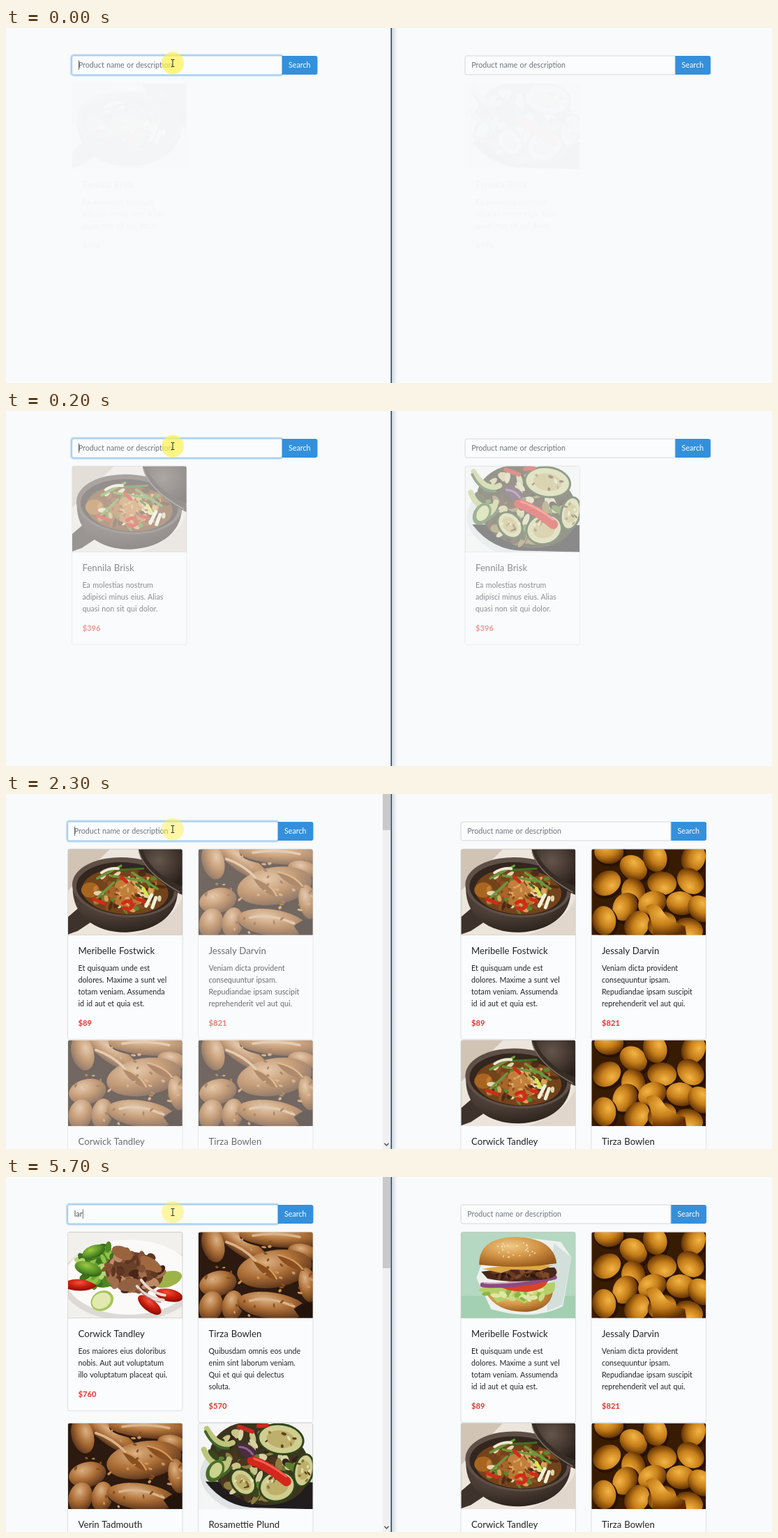
Write an HTML page that moves like this. It is 1098x510 px and loops after 5800 ms.

```html
<!DOCTYPE html>
<html lang="en">
<head>
<meta charset="utf-8">
<title>Product search in two windows</title>
<style>
  html, body { margin: 0; width: 100%; height: 100%; overflow: hidden; background: #f8fafc; }
  svg { display: block; width: 100vw; height: 100vh; }
  text { font: 10.7px Lato, "Open Sans", sans-serif; word-spacing: .6px; fill: #212529; }
  .name { font-size: 13.2px; }
  .price { font-size: 11.2px; font-weight: 700; fill: #e3342f; }
  .hint { fill: #6c757d; }
  .typed { fill: #495057; }
  .label { fill: #fff; text-anchor: middle; }
</style>
</head>
<body>
<svg id="stage" viewBox="0 0 1098 510">
  <defs id="defs"></defs>
  <g id="view"></g>
  <g id="chrome"></g>
</svg>
<script>
const $ = id => document.getElementById(id);

// Shape helpers
const ell = (x, y, rx, ry, turn, fill) =>
  `<ellipse rx="${rx}" ry="${ry}" fill="${fill}" transform="translate(${x} ${y}) rotate(${turn})"/>`;
const area = (d, fill) => `<path d="${d}" fill="${fill}"/>`;
const line = (d, color, width) =>
  `<path d="${d}" fill="none" stroke="${color}" stroke-width="${width}" stroke-linecap="round"/>`;
const rect = (x, y, w, h, fill, extra = '') =>
  `<rect x="${x}" y="${y}" width="${w}" height="${h}" fill="${fill}" ${extra}/>`;
const text = (x, y, s, cls = '') => `<text x="${x}" y="${y}" class="${cls}">${s}</text>`;
const ground = fill => rect(0, 0, 164, 124, fill);

function random(seed) {
  seed *= 7919;
  return () => (seed = (seed * 16807) % 2147483647) / 2147483647;
}

// Scatters shapes inside an ellipse
function scatter(seed, count, cx, cy, rx, ry, draw) {
  const rnd = random(seed);
  let out = '';
  for (let i = 0; i < count; i++) {
    const a = rnd() * 2 * Math.PI, r = Math.sqrt(rnd());
    out += draw(cx + Math.cos(a) * r * rx, cy + Math.sin(a) * r * ry, rnd);
  }
  return out;
}
const pick = (rnd, list) => list[Math.floor(rnd() * list.length)];
const bits = (colors, size) => (x, y, rnd) =>
  ell(x, y, size * (.7 + rnd() * .6), size * (.35 + rnd() * .35), rnd() * 180, pick(rnd, colors));

const gradients = {
  bun: ['#f3b545', '#c67f1a', '#5a2b02'],
  loaf: ['#dcb184', '#ab6d35', '#54301a'],
  red: ['#f0523c', '#c91d0d', '#7c0b05'],
  carrot: ['#ff8f3c', '#e25c14', '#9c3106'],
  dome: ['#efc987', '#d29345', '#94571b'],
  iron: ['#65564c', '#493c34', '#2a201b'],
  leaf: ['#9dc845', '#5f9a2a', '#2e5a14']
};
const shade = name => `url(#${name})`;

function slice(x, y, rx, ry, turn) {
  return ell(x, y, rx, ry, turn, '#2f451c') + ell(x, y, rx - 3, ry - 3, turn, '#d0cd90') +
    ell(x, y, rx * .6, ry * .55, turn, '#bdb06a') +
    scatter(Math.round(x * 7 + y), 9, x, y, rx * .65, ry * .65, bits(['#8d7434', '#5f431c', '#e4dfb2'], 3));
}
function loaf(x, y, rx, ry, turn) {
  return ell(x + 1, y + 3, rx, ry, turn, '#2c180d') + ell(x, y, rx, ry, turn, shade('loaf'));
}
function roll(x, y) {
  return `<g transform="translate(${x} ${y}) scale(1.35)">` +
    area('M-17 0q-1 18 2 25q15 8 30 0q4 -10 2 -25z', '#dfc3ae') +
    area('M-13 8q0 10 2 18q8 3 12 1l-2 -18z', '#c3c7a3') +
    area('M5 10l8 -3q3 12 0 18l-9 2z', '#e5a893') +
    ell(0, 0, 17, 10, 0, '#efe2d4') + ell(0, 0, 13, 7, 0, '#c1bd86') +
    scatter(x + y, 16, 0, 0, 11, 6, bits(['#6f9a3b', '#e98336', '#f5f0df', '#b64a2a'], 4)) + '</g>';
}

const pictures = {
  pot: () => ground('#ece5dc') + area('M0 0H60L20 40L0 60Z', '#d2c4b5') +
    area('M95 124Q150 105 164 70V124Z', '#e0d6cc') +
    area('M0 98L16 84L32 106L14 118L0 123Z', '#3d322c') +
    area('M7 54C5 96 40 121 84 120C130 118 160 92 157 55Z', shade('iron')) +
    ell(82, 55, 76, 43, 4, '#5e5047') + ell(82, 57, 70, 38, 4, '#33261e') +
    ell(82, 61, 62, 33, 4, '#73431b') + ell(32, 59, 13, 11, 0, '#a7651f') +
    scatter(71, 80, 84, 60, 52, 28, bits(['#c27c37', '#8d4e20', '#d9a159', '#5d8630', '#4f2c14', '#e5d3ad'], 6)) +
    ell(82, 57, 16, 11, 30, '#c17f3c') + ell(85, 75, 19, 8, 0, '#b87733') + ell(64, 62, 11, 8, 20, '#a9642b') +
    scatter(12, 26, 83, 66, 26, 15, bits(['#dba65e', '#8a4a1c'], 3)) +
    line('M42 42L76 24M60 38L108 46M92 34L128 57M42 70L66 48', '#6b973c', 3.5) +
    line('M70 30L108 28M110 60L98 50', '#3f6f24', 3) + line('M48 34Q60 26 72 28', '#efe7d3', 4) +
    line('M120 66L112 82M126 70L121 84', '#eef0d7', 5) + line('M108 57L113 66', '#dce34e', 5) +
    line('M37 72L52 78M76 40L84 47M79 78Q90 70 93 82Q88 89 80 85M100 72L108 75', '#d6291a', 5) +
    area('M101 0H164V66Q148 60 125 39Q105 22 101 0Z', '#372d27') +
    area('M107 0H164V54Q140 44 124 28Q110 14 107 0Z', shade('iron')) +
    line('M102 4Q110 34 160 62', '#7d6e64', 1.5),

  zucchini: () => ground('#f4f5f4') + ell(86, 80, 84, 54, 8, '#dfe3e4') +
    area('M10 84Q40 124 90 122L164 124V85Z', '#211c1d') + ell(88, 58, 74, 58, 20, '#3b351e') +
    scatter(53, 95, 84, 58, 66, 52, bits(['#5e7d2f', '#c9c488', '#38461f', '#8d7b41', '#d6d2a5', '#332219', '#4a3520'], 9)) +
    line('M12 8Q30 38 49 28M8 38Q17 63 38 58M22 77Q40 70 44 52', '#bdc47b', 8) +
    line('M10 12Q22 37 43 36M20 80Q36 78 47 64', '#40652b', 4) +
    ell(24, 69, 12, 17, 30, '#496c2c') + ell(25, 68, 8, 12, 30, '#cbd38c') +
    slice(118, 23, 34, 23, 8) + slice(64, 85, 22, 17, 50) + slice(113, 91, 27, 23, -15) +
    slice(151, 68, 15, 25, 12) +
    line('M77 54Q100 61 126 84', '#d3271e', 14) + line('M80 51Q104 59 126 77', '#ee6250', 3) +
    line('M58 5L77 12M86 4L98 3', '#c92a1e', 6) +
    area('M54 31Q72 23 85 43Q74 54 63 46Z', '#4a2c43') + line('M59 34Q70 34 78 45', '#8f6883', 3),

  buns: () => {
    const spots = [[25, 4], [60, 27], [91, 12], [146, 13], [22, 49], [101, 49], [142, 46], [60, 62],
      [48, 83], [87, 78], [128, 78], [157, 86], [18, 103], [65, 109], [101, 108], [139, 116]];
    return ground('#381b03') + spots.map(([x, y], i) =>
      ell(x + 2, y + 3, 23, 18, i * 37, '#281201') + ell(x, y, 21, 17, i * 37, shade('bun'))).join('') +
      area('M78 83Q91 73 102 89Q110 104 134 111L136 124H88Q88 104 78 83Z', shade('bun'));
  },

  bread: () => ground('#2c190f') + loaf(62, 18, 48, 14, 35) + loaf(21, 18, 26, 16, 75) +
    loaf(120, 7, 62, 15, 4) + loaf(150, 29, 22, 12, 12) +
    loaf(28, 74, 27, 18, -12) + loaf(109, 53, 54, 27, -9) + loaf(18, 107, 17, 22, 15) +
    loaf(49, 106, 15, 22, 10) + loaf(105, 106, 50, 19, 8) + loaf(157, 76, 13, 25, -10) +
    area('M78 41Q104 46 114 70Q90 64 78 41Z', '#8a4f20') +
    area('M112 33Q140 36 152 56Q128 54 112 33Z', '#8a4f20') +
    line('M80 41Q102 48 112 67M114 33Q138 38 149 53', '#d39a5a', 2.5) +
    line('M74 99Q98 91 137 107M40 14Q64 22 82 41M78 5Q110 -1 145 7', '#d8b48c', 3.5) +
    scatter(44, 40, 84, 66, 80, 58, bits(['#c8935c', '#87501f'], 3)) +
    area('M137 111Q153 97 164 104V124H146Z', '#22130b'),

  rolls: () => ground('#ece6df') + area('M0 0H88L46 18L0 44Z', '#d5cec8') +
    area('M0 66L64 8Q104 -4 164 30V70L94 124H12Z', '#d2b57d') +
    area('M5 70L66 13Q105 6 159 34L153 66L87 116Q35 104 5 70Z', '#e8d8ae') +
    area('M75 11Q94 0 118 9L164 23V48Q134 59 109 43L79 32Z', '#f4f1ed') +
    ell(99, 21, 19, 10, 6, '#9b2d16') + ell(142, 34, 23, 10, 8, '#782010') +
    ell(99, 18, 13, 4, 6, '#c44a25') +
    roll(47, 39) + roll(29, 66) + roll(85, 64) +
    scatter(91, 30, 133, 76, 20, 19, bits(['#c78b3f', '#8f5a25', '#e0ad65'], 3.5)) +
    scatter(17, 14, 74, 112, 15, 6, bits(['#c78b3f', '#8f5a25', '#dfa45a'], 3.5)),

  vegetables: () => ground('#35120a') + ell(20, 10, 29, 25, 15, shade('red')) +
    ell(52, 27, 22, 20, 0, shade('red')) + ell(87, 10, 18, 16, 0, shade('red')) +
    area('M31 0L43 11L50 0Z', '#2d611a') + ell(46, 20, 5, 3, -30, '#ffc0ad') +
    [[117, 9, 30, 10, 35], [145, 20, 28, 10, 18], [124, 35, 29, 10, 20], [150, 48, 28, 11, -8],
      [114, 55, 28, 10, 30], [144, 66, 23, 9, 15]].map(a => ell(...a, shade('carrot'))).join('') +
    area('M0 50Q23 36 38 57L25 124H0Z', '#9c120b') +
    area('M36 53Q58 42 77 58L47 120L18 124Z', shade('red')) +
    area('M68 67Q84 59 92 77L46 124H24Z', '#b91c0f') +
    line('M8 62L22 108M47 58L27 115M77 73L43 119', '#e45a40', 3) +
    area('M82 80Q104 60 138 78L164 88V124H52Z', '#27591a') +
    area('M82 86L101 72Q122 80 132 90L104 106Z', '#b3cf79') +
    area('M108 119L150 96L164 103V124H110Z', '#c3d68c') +
    area('M62 110L82 97L101 117L94 124H56Z', '#9abd5c') +
    line('M86 88L108 82M116 115L152 101', '#e2eab8', 3),

  salad: () => ground('#f2f0ed') + ell(88, 70, 98, 58, 0, '#ddd9d6') + ell(88, 65, 92, 54, 0, '#fbfaf8') +
    ell(50, 52, 30, 28, 0, '#4d8426') +
    scatter(31, 50, 50, 50, 34, 30, bits(['#6ba72f', '#8fc24a', '#3c721e', '#b7d373', '#4e8924'], 9)) +
    ell(37, 28, 17, 9, -20, shade('leaf')) + ell(29, 53, 20, 10, 18, shade('leaf')) +
    ell(143, 68, 21, 11, -18, '#9db34a') + ell(95, 58, 42, 29, 10, '#6b4029') +
    scatter(48, 60, 94, 57, 40, 29, bits(['#835134', '#a36e4b', '#5e3621', '#bc8b66', '#472617'], 8)) +
    ell(78, 30, 16, 9, 24, '#99633d') + ell(119, 46, 18, 8, 35, '#a0683f') + ell(88, 76, 17, 9, -10, '#936044') +
    area('M0 70Q20 63 42 77Q27 89 0 82Z', shade('red')) +
    ell(145, 91, 20, 9, 12, shade('red')) + ell(117, 105, 20, 9, 38, shade('red')) +
    ell(49, 99, 17, 14, -30, '#a7c558') + ell(48, 99, 14, 11, -30, '#e1e9af') +
    line('M99 78Q111 94 137 98M105 69Q119 88 139 91', '#e9d7cf', 4) + line('M101 82Q113 98 133 101', '#986f80', 1.3),

  burger: () => ground('#b4d8c1') + rect(0, 92, 164, 32, '#a3cfb2') +
    area('M35 30L94 8L143 14L158 36L146 107Q102 129 43 111L22 66Z', '#edf1ee') +
    area('M133 16L158 36L145 105L123 114Z', '#d3dfda') +
    area('M36 88Q80 106 132 83Q130 111 95 115Q51 116 36 88Z', shade('dome')) +
    area('M24 84Q42 70 68 83L134 72Q139 91 115 91L91 103L73 94L52 102L43 91Z', '#b6cf68') +
    scatter(63, 24, 80, 88, 46, 9, bits(['#dfe7a6', '#8fb446', '#c9dc83'], 6)) +
    area('M49 75Q82 67 125 70Q120 84 95 86Q67 87 49 75Z', '#d94428') +
    line('M31 76Q74 80 134 65', '#8b4a80', 7) + line('M33 73Q78 76 133 62', '#d8adc8', 2) +
    area('M29 57Q77 50 134 51Q143 61 127 67Q77 75 38 67Z', '#48281b') +
    scatter(29, 30, 84, 61, 47, 6, bits(['#6a3a23', '#2c1811', '#7c4a2a'], 5)) +
    area('M31 53Q74 45 132 48L114 55L72 54L57 59Z', '#dda845') +
    area('M26 47Q25 8 78 7Q132 8 137 45Q87 54 26 47Z', shade('dome')) +
    scatter(83, 24, 77, 25, 40, 12, bits(['#f7e5b6'], 1.4))
};

const items = {
  brisk: ['Fennila Brisk', '$396', 'Ea molestias nostrum', 'adipisci minus eius. Alias', 'quasi non sit qui dolor.'],
  tandley: ['Corwick Tandley', '$760', 'Eos maiores eius doloribus', 'nobis. Aut aut voluptatum', 'illo voluptatum placeat qui.'],
  fostwick: ['Meribelle Fostwick', '$89', 'Et quisquam unde est', 'dolores. Maxime a sunt vel', 'totam veniam. Assumenda', 'id id aut et quia est.'],
  darvin: ['Jessaly Darvin', '$821', 'Veniam dicta provident', 'consequuntur ipsam.', 'Repudiandae ipsam suscipit', 'reprehenderit vel aut qui.'],
  bowlen: ['Tirza Bowlen', '$570', 'Quibusdam omnis eos unde', 'enim sint laborum veniam.', 'Qui et qui qui delectus', 'soluta.'],
  tadmouth: ['Verin Tadmouth', '$214', 'Sit autem rerum', 'et quo minima.', 'Nihil vel odit.'],
  plund: ['Rosamettie Plund', '$432', 'Quo sed dolores', 'ut et aliquam.', 'Non ea magni.']
};

// Cards: [item, picture, opacity]
const single = (pic, alpha) => [['brisk', pic, alpha]];
const start = (time, alpha, caret) =>
  ({ time, leftX: 94.5, rightX: 658, caret, left: single('pot', alpha), right: single('zucchini', alpha) });
const fullRight = first => [['fostwick', first, 1], ['darvin', 'buns', 1], ['tandley', 'pot', 1], ['bowlen', 'buns', 1]];
const wide = { leftX: 88.5, rightX: 652, caret: .8 };

const steps = [
  start(0, .02, .9),
  start(100, .25, .9),
  start(200, .5, .9),
  start(600, 1, 0),
  { time: 1200, leftX: 94.5, rightX: 652, caret: .5, left: single('pot', 1),
    right: [['tandley', 'pot', 1], ['bowlen', 'buns', .02], ['tadmouth', 'zucchini', .02], ['plund', 'pot', .02]] },
  { ...wide, time: 2300, thumb: 52, right: fullRight('pot'),
    left: [['fostwick', 'pot', 1], ['darvin', 'bread', .65], ['tandley', 'bread', .65], ['bowlen', 'bread', .65]] },
  { ...wide, time: 4300, thumb: 46, typed: 'la', right: fullRight('pot'),
    left: [['fostwick', 'rolls', 1], ['darvin', 'vegetables', 1], ['tandley', 'salad', 1], ['bowlen', 'bread', 1]] },
  { ...wide, time: 5700, thumb: 131, typed: 'lar', right: fullRight('burger'),
    left: [['tandley', 'salad', 1], ['bowlen', 'bread', 1], ['tadmouth', 'bread', 1], ['plund', 'zucchini', 1]] }
];
const LOOP = 5800;

function card([key, pic, alpha], x, y) {
  const [name, price, ...lines] = items[key];
  const height = 206.5 + lines.length * 16.8;
  return `<g opacity="${alpha}" transform="translate(${x} ${y})">` +
    rect(0, 0, 164.5, height, '#fafcfd', 'rx="3" stroke="#000" stroke-opacity=".125" stroke-width=".9"') +
    `<use href="#${pic}" x=".3" y=".3" width="164" height="123.4"/>` +
    text(15, 150.5, name, 'name') +
    lines.map((s, i) => text(15, 175.3 + i * 16.8, s)).join('') +
    text(15, 187 + lines.length * 16.8, price, 'price') + '</g>';
}

function cards(list, x) {
  return list.map((c, i) => card(c, x + (i % 2) * 187, 79 + Math.floor(i / 2) * 274.5)).join('');
}

function search(x, focused, typed) {
  const ring = focused
    ? rect(x - 1.2, 38.8, 303.5, 29.4, 'none', 'rx="3.5" stroke="#3490dc" stroke-opacity=".3" stroke-width="2.4"')
    : '';
  return area(`M${x + 301} 40h48q3 0 3 3v21q0 3 -3 3h-48z`, '#3490dc') +
    text(x + 326.3, 57, 'Search', 'label') +
    area(`M${x + 3} 40h298v27h-298q-3 0 -3 -3v-21q0 -3 3 -3z`,
      `#fafcfd" stroke="${focused ? '#a1cbef' : '#ced4da'}" stroke-width=".9`) + ring +
    text(x + 9.3, 57, typed || 'Product name or description', typed ? 'typed' : 'hint');
}

function scrollbar(thumb) {
  return rect(540, 0, 12, 510, '#f0f0f0') + rect(540, 0, 12, thumb, '#c9c9c9') +
    line('M542.8 502.3L545.5 505L548.2 502.3', '#505050', 1.4);
}

function draw(step) {
  const { leftX, rightX, left, right, typed, thumb, caret } = step;
  $('view').innerHTML = cards(left, leftX) + cards(right, rightX) +
    search(rightX, false) + search(leftX, true, typed) + (thumb ? scrollbar(thumb) : '');
  const word = $('view').querySelector('.typed');
  const caretX = leftX + 9.6 + (word ? word.getComputedTextLength() : 0);
  $('view').innerHTML += rect(caretX, 46.5, .8, 13.5, '#212529', `opacity="${caret}"`) +
    `<circle cx="239" cy="50.5" r="16" fill="#fff250" opacity="${thumb ? .5 : .7}"/>` +
    line('M237 45.5H238.4M239.6 45.5H241M239 46V55M237 55.5H238.4M239.6 55.5H241', '#222', 1);
}

$('defs').innerHTML =
  '<clipPath id="round"><path d="M0 124V3Q0 0 3 0H161Q164 0 164 3V124Z"/></clipPath>' +
  '<filter id="soft" x="0" y="0" width="1" height="1"><feGaussianBlur stdDeviation=".6"/></filter>' +
  '<linearGradient id="edge"><stop stop-color="#c6d0d8"/><stop offset=".4" stop-color="#e3e8ec"/>' +
  '<stop offset="1" stop-color="#f8fafc"/></linearGradient>' +
  Object.entries(gradients).map(([id, c]) => `<radialGradient id="${id}" cx=".4" cy=".3" r=".75">` +
    c.map((v, i) => `<stop offset="${i / 2}" stop-color="${v}"/>`).join('') + '</radialGradient>').join('') +
  Object.entries(pictures).map(([id, make]) =>
    `<symbol id="${id}" viewBox="0 0 164 124" preserveAspectRatio="none"><g clip-path="url(#round)">` +
    `${ground('#8b7a68')}<g filter="url(#soft)">${make()}</g></g></symbol>`).join('');
$('chrome').innerHTML = rect(553, 0, 8, 510, 'url(#edge)') + rect(551, 0, 1, 510, '#8fa5b5') +
  rect(552, 0, 1, 510, '#1b3f59');

let shown;
function render(time) {
  const now = time % LOOP;
  const step = steps.filter(s => s.time <= now).pop();
  if (step !== shown) draw(shown = step);
}

const began = performance.now();
function tick() {
  render(Math.max(0, performance.now() - began));
  requestAnimationFrame(tick);
}
tick();
</script>
</body>
</html>
```
